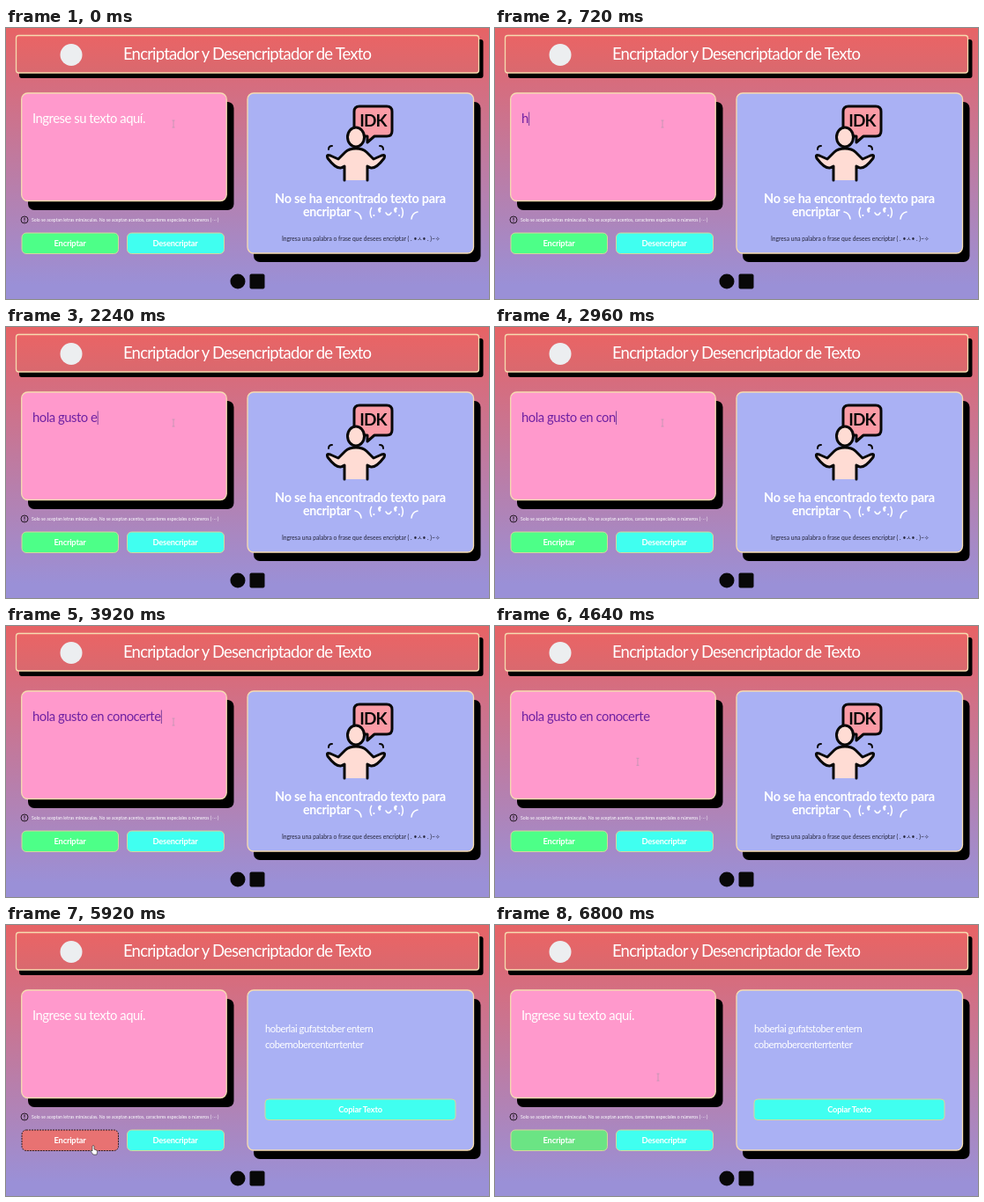
Write an HTML page that moves like this. It is 548 px wide and 308 px high and loops after 6.88 s.

```html
<!DOCTYPE html>
<html lang="es">
<head>
<meta charset="utf-8">
<title>Encriptador</title>
<style>
html, body { margin: 0; width: 100%; height: 100%; overflow: hidden; }
svg { display: block; width: 548px; height: 308px; font-family: Lato, "Open Sans", sans-serif; }
text { fill: #fff; white-space: pre; }
.bold { font-weight: 700; }
.mid { text-anchor: middle; }
.panel { stroke: #f6dcb0; stroke-width: 1.3; }
.button { stroke: #d4d79a; }
.label { font-size: 9.3px; letter-spacing: -.2px; font-weight: 700; text-anchor: middle; }
.output { font-size: 11.2px; letter-spacing: -.45px; }
.ink { stroke: #080808; stroke-width: 3; stroke-linecap: round; stroke-linejoin: round; }
</style>
</head>
<body>
<svg viewBox="0 0 548 308">
  <defs>
    <linearGradient id="sky" x2="0" y2="1">
      <stop stop-color="#e76365"/><stop offset=".95" stop-color="#9a90d7"/>
    </linearGradient>
    <linearGradient id="bar" x2="0" y2="1">
      <stop stop-color="#ea6465"/><stop offset="1" stop-color="#d9696f"/>
    </linearGradient>
  </defs>
  <rect width="548" height="308" fill="url(#sky)"/>

  <rect x="15" y="13" width="526.5" height="44" rx="3"/>
  <rect class="panel" x="11.5" y="8.5" width="525" height="42.5" rx="3" fill="url(#bar)"/>
  <circle cx="74" cy="30.5" r="12.5" fill="#eceef0"/>
  <text x="133" y="35.8" font-size="18.5" letter-spacing="-.8">Encriptador y Desencriptador de Texto</text>

  <rect x="25" y="84" width="233.5" height="123" rx="7"/>
  <rect class="panel" x="17.7" y="74" width="232.5" height="122.5" rx="7" fill="#ff99cc"/>
  <text id="input" x="30" y="108.3" font-size="14.8" letter-spacing="-.46"></text>
  <path id="caret" stroke="#5a2a90" stroke-width=".8"/>

  <circle cx="21" cy="218" r="4" fill="none" stroke="#1a1018" stroke-width=".9"/>
  <path d="M21 215.5v3M21 219.6v1" stroke="#1a1018"/>
  <text x="29" y="220.2" font-size="5.1">Solo se aceptan letras minúsculas. No se aceptan acentos, caracteres especiales o números (･-･)</text>

  <rect id="encrypt" class="button" x="18" y="233" width="109.5" height="23.5" rx="5"/>
  <text class="label" x="72.5" y="247.7">Encriptar</text>
  <rect class="button" x="137.5" y="233" width="110" height="23.5" rx="5" fill="#40fff0"/>
  <text class="label" x="192" y="247.7">Desencriptar</text>

  <rect x="281" y="84" width="257.5" height="182" rx="7"/>
  <rect class="panel" x="274" y="74" width="256.5" height="182" rx="7" fill="#aab1f4"/>

  <g id="empty">
    <g class="ink">
      <path fill="#fb9ca6" d="M401 89H432Q438 89 438 95V117Q438 123 432 123H418L410 130V123H401Q395 123 395 117V95Q395 89 401 89Z"/>
      <path fill="#ffdcd4" d="M384 173V157L380 159Q374 160 365 148Q363 143 368 145L377 149L385 141Q389 137 397 137Q405 137 409 141L417 149L426 145Q431 143 429 148Q420 160 414 159L410 157V173"/>
      <ellipse cx="397" cy="124" rx="9.5" ry="11" fill="#ffdcd4"/>
      <path fill="none" stroke-width="2" d="M366 138q0-4 4-4M428 138q0-4-4-4"/>
    </g>
    <text class="bold mid" x="416.500" y="112" font-size="19" letter-spacing="-.8" style="fill:#080808">IDK</text>
    <text class="bold mid" x="402" y="198.500" font-size="14.500" letter-spacing="-.3">No se ha encontrado texto para</text>
    <text class="bold" x="337" y="213.500" font-size="14.200" letter-spacing="-.3">encriptar</text>
    <g fill="none" stroke="#fff" stroke-width="1.500" stroke-linecap="round">
      <path d="M396 209q6 1 7 8M460 217q1-7 7-8M431 210q3 5 6 0"/>
      <path stroke-width="2.600" d="M424 208.500l-.3-.5q-1-2 .8-3M442 208.500l-.3-.5q-1-2 .8-3"/>
    </g>
    <text class="bold" x="412" y="213.500" font-size="14">(.</text>
    <text class="bold" x="444.500" y="213.500" font-size="14">.)</text>
    <text x="313" y="242" font-size="6.700" style="fill:#25253a">Ingresa una palabra o frase que desees encriptar ( . •ㅅ• . )~✧</text>
  </g>

  <g id="result">
    <text class="output" x="294" y="121.500">hoberlai gufatstober entern</text>
    <text class="output" x="294" y="139.500">cobernobercenterrtenter</text>
    <rect class="button" x="294" y="198" width="216" height="23.500" rx="4" fill="#40fff0"/>
    <text class="label" x="402" y="213">Copiar Texto</text>
  </g>

  <circle cx="263" cy="288" r="8.500" fill="#080808"/>
  <rect x="276.500" y="279.500" width="17" height="17" rx="2" fill="#080808"/>

  <g id="mouse">
    <path id="beam" fill="none" stroke="#bd95b0" stroke-width=".8" d="M-1.500-4h3M0-4v8M-1.500 4h3"/>
    <path id="hand" fill="#fff" stroke="#222" stroke-width=".6" d="M-1-5Q0-6 1-5V-1L4 0Q5 1 4 5H0L-3 1Q-3-1-1 1Z"/>
    <path id="arrow" fill="#fff" stroke="#222" stroke-width=".6" d="M0 0V9L2 7L4 10L5 9L3.500 6.500H6Z"/>
  </g>
</svg>
<script>
const LOOP = 6880, STEP = 80, CLICK = 5650;
const TYPE_START = 440, KEY_TIME = 147, PHRASE = "hola gusto en conocerte";
const $ = id => document.getElementById(id);
const ramp = (t, from, to) => Math.min(1, Math.max(0, (t - from) / (to - from)));
const smooth = p => p * p * (3 - 2 * p);
const easeOut = p => 1 - (1 - p) ** 2;
const mix = (a, b, p) => a + (b - a) * p;
const show = (id, on) => $(id).style.display = on ? "" : "none";

function drawInput(t) {
  const keys = Math.floor((t - TYPE_START) / KEY_TIME);
  const typed = t < CLICK && keys > 0;
  const input = $("input");
  input.textContent = typed ? PHRASE.slice(0, keys) : "Ingrese su texto aquí.";
  input.style.fill = typed ? "#6f21a3" : "#fff";

  const idle = t - TYPE_START - PHRASE.length * KEY_TIME;
  show("caret", typed && (idle < 0 || idle % 1000 < 500));
  if (typed) $("caret").setAttribute("d", `M${30.8 + input.getComputedTextLength()} 95.5V111`);
}

function drawButton(t) {
  const heat = easeOut(ramp(t, 4900, 5400)) - easeOut(ramp(t, 6520, 7020));
  const cool = [77, 255, 136], warm = [232, 114, 114];
  const hover = t >= 4900 && t < 6520;
  const button = $("encrypt");
  button.style.fill = `rgb(${cool.map((c, i) => mix(c, warm[i], heat))})`;
  button.style.stroke = hover ? "#302020" : "";
  button.style.strokeDasharray = hover ? "2 1" : "";
}

function drawMouse(t) {
  const go = smooth(ramp(t, 4400, 5050)), back = smooth(ramp(t, 6400, 6800));
  const x = mix(mix(190, 99, go), 185, back);
  const y = mix(mix(109, 256, go), 173, back);
  $("mouse").setAttribute("transform", `translate(${x} ${y})`);
  const onText = y < 197, onButton = y > 233 && x < 128;
  show("beam", onText);
  show("hand", onButton);
  show("arrow", !onText && !onButton);
}

function draw(now) {
  const t = Math.floor(now % LOOP / STEP) * STEP;
  drawInput(t);
  drawButton(t);
  drawMouse(t);
  show("empty", t < CLICK);
  show("result", t >= CLICK);
}

const start = performance.now();
function tick() {
  draw(performance.now() - start);
  requestAnimationFrame(tick);
}
tick();
</script>
</body>
</html>
```
